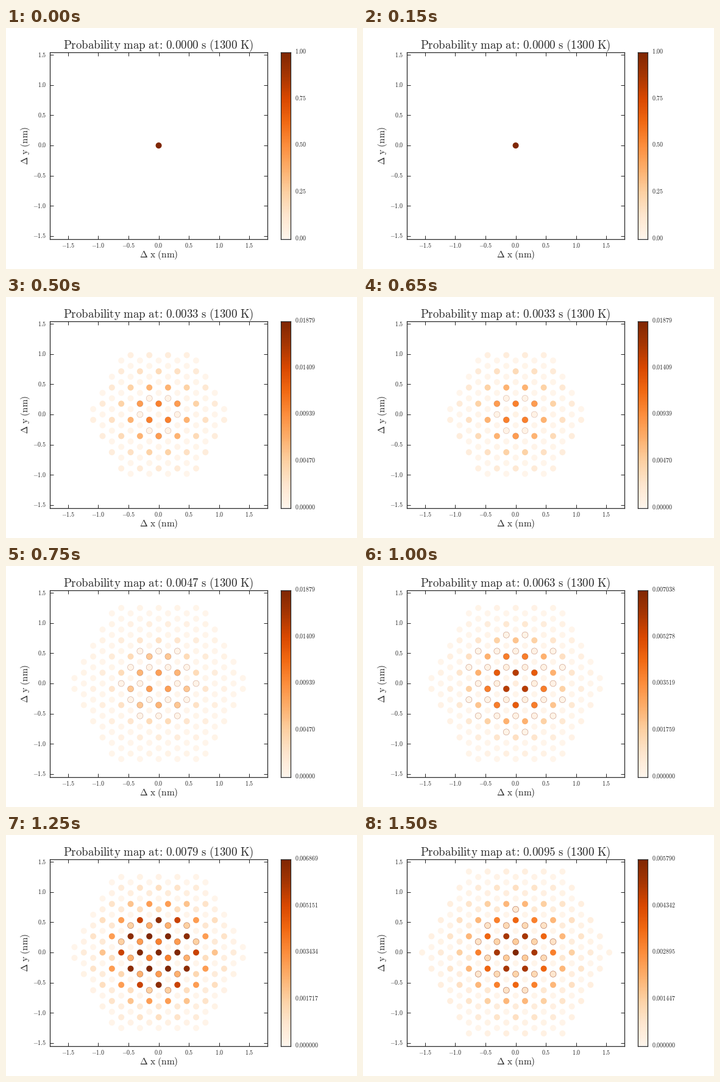
These frames come from a looping animation (576 px wide and 396 px high, 1.75 s). A matplotlib script:

```python
import numpy as np
import matplotlib.pyplot as plt
from matplotlib.animation import FuncAnimation

plt.rcParams.update({"mathtext.fontset": "cm", "font.family": "DejaVu Serif"})

W, H, DPI = 576, 396, 72
INK = "0.15"
SCALE = 99.2                    # pixels per nm
DX = 0.3095 / 2                 # column spacing of the lattice, nm
DY = DX / np.sqrt(3)            # half the site spacing within a column
CMAP = plt.get_cmap("Oranges")
QUARTERS = np.linspace(0, 1, 5)

TIMES = [0, 0.0019, 0.0033, 0.0047, 0.0063, 0.0079, 0.0095]
MAXIMA = [1, 0.11, 0.018789, 0.018789, 0.0070379, 0.0068686, 0.0057898]

# Triangular lattice; every third half-step belongs to the same sublattice
n, k = np.mgrid[-15:16, -15:16].reshape(2, -1)
n, k = np.array([n, k])[:, (n - k) % 2 == 0]
r2 = 3 * n**2 + k**2
on_a, on_b = k % 3 == 0, k % 3 == 2


def reach(i):
    """Radius of the hexagon of visited sites: fast spread, then slow growth."""
    return round((13.4 + 0.2 * i) / (1 + np.exp(-2.6 * (i - 1.5))))


def probability(i):
    """Site probabilities: flat at first, then Gaussian on each sublattice."""
    if i < 2:
        a, b, spread = MAXIMA[i], 0.56 * MAXIMA[i], np.inf
    else:
        a = 0.0118 * 2.0 ** (5 - i) if i > 4 else 0.0004
        b = 0.0157 - 0.00235 * i
        spread = 57 + 20 * (i / 6) ** 8
    return (a * on_a + b * on_b) * np.exp(-r2 / spread)


def outlined(i):
    """Recently occupied sites keep a thin dark rim."""
    rim_b = on_b & (r2 <= 12 * i - 8)
    rim_a = on_a & (r2 > 0) & (r2 <= 36 * i - 60)
    return (rim_a | rim_b) if 1 < i < 5 else rim_b & (i > 1)


def label(x, y, s, size=10, **kw):
    """Text placed in pixels from the top left of the stage."""
    kw = {"ha": "center", "va": "center", **kw}
    return fig.text(x / W, 1 - y / H, s, size=size, color=INK, **kw)


fig = plt.figure(figsize=(W / DPI, H / DPI), dpi=DPI, facecolor="white")
left, bottom, width, height = 72, 49.5, 357.12, 306.9
cx, cy = left + width / 2, H - bottom - height / 2

ax = fig.add_axes([left / W, bottom / H, width / W, height / H])
ax.set_xlim(-width / 2 / SCALE, width / 2 / SCALE)
ax.set_ylim(-height / 2 / SCALE, height / 2 / SCALE)
ticks = np.arange(-1.5, 1.6, 0.5)
ax.set_xticks(ticks)
ax.set_yticks(ticks)
ax.tick_params(direction="in", length=6, width=1, color=INK, top=True,
               right=True, labelbottom=False, labelleft=False)

cax = fig.add_axes([451.44 / W, bottom / H, height / 20 / W, height / H])
cax.imshow(np.linspace(0, 1, 256)[:, None], cmap=CMAP, origin="lower",
           aspect="auto", interpolation="nearest")
cax.set_xticks([])
cax.set_yticks([])
for a in (ax, cax):
    for spine in a.spines.values():
        spine.set(linewidth=1.25, color=INK)

for v in ticks:
    label(cx + v * SCALE, 356.7, f"${v:.1f}$")
    label(66.3, cy - v * SCALE - 0.6, f"${v:.1f}$", ha="right")
label(cx, 377.3, r"$\Delta\ \mathrm{x\ (nm)}$", 15.3, va="baseline")
label(42.5, cy, r"$\Delta\ \mathrm{y\ (nm)}$", 15.3, rotation=90, ha="right")

title = label(cx, 33.6, "", 18.9, va="baseline")
marks = [label(474, H - bottom - q * height - 1.6, "", ha="left")
         for q in QUARTERS]
dots = ax.scatter(n * DX, k * DY, s=100, zorder=2)


def draw(i):
    vmax, radius = MAXIMA[i], reach(i)
    inside = (abs(k) <= radius) & (3 * abs(n) + abs(k) <= 2 * radius)
    faces = CMAP(np.clip(probability(i) / vmax, 0, 1))
    faces[:, 3] = inside
    rim = outlined(i) & inside
    edges = np.tile(CMAP(0.95), (len(n), 1))
    edges[:, 3] = rim * (0.12 + 0.09 * i)
    dots.set_facecolor(faces)
    dots.set_edgecolor(edges)
    dots.set_linewidth(0.6 * rim)

    text = rf"Probability map at\!:\,{TIMES[i]:.4f} s (1300 K)"
    title.set_text(r"$\mathrm{%s}$" % text.replace(" ", r"\ "))
    decimals = round(2 - 1.8 * np.log10(vmax))
    for q, mark in zip(QUARTERS, marks):
        mark.set_text(f"${q * vmax:.{decimals}f}$")
    return [dots, title, *marks]


anim = FuncAnimation(fig, draw, frames=len(TIMES), interval=250,
                     repeat=True, repeat_delay=0)
plt.show()
```
